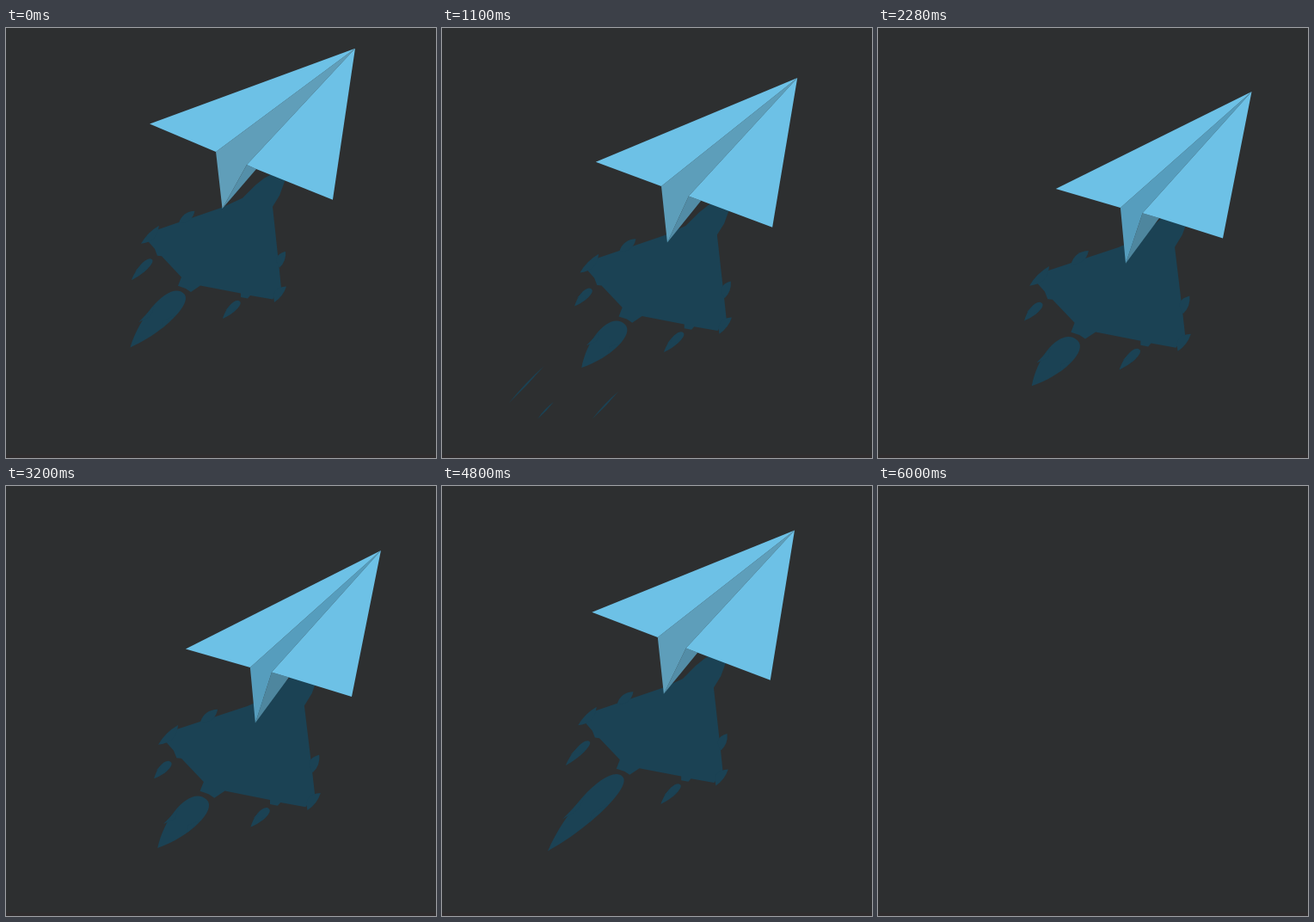
An HTML page with a canvas that plays this animation: 500 px wide and 500 px high, repeating every 6020 ms.

```html
<!DOCTYPE html>
<html lang="en">
<head>
<meta charset="utf-8">
<title>Paper plane</title>
<style>
html, body { margin: 0; width: 100%; height: 100%; overflow: hidden; background: #2d2f30; }
canvas { display: block; width: 500px; height: 500px; }
</style>
</head>
<body>
<canvas id="stage" width="500" height="500"></canvas>
<script>
const ctx = document.getElementById('stage').getContext('2d');
const LOOP = 6020, CYCLE = 6000;
const SHADE = '#1b4254', SKY = '#6dc1e6';

// Plane corners relative to the tip: at rest, and at full sway
const corners = {
  left: [[-239, 87.5], [-227, 114.5]],
  fold: [[-162, 120], [-152, 136]],
  keel: [[-154.5, 186], [-146, 200.5]],
  inner: [[-126, 135], [-127, 141.5]],
  back: [[-115, 140], [-107, 147.5]],
  right: [[-26, 176], [-34, 170]],
  shadow: [[-249, 226], [-259, 224.5]]
};

const hull = [
  [326, 160], [325, 175], [318, 194], [310, 207], [317.5, 277], [320, 302], [310, 314.5],
  [284, 310], [281, 313.5], [273, 312], [273, 307.5], [226, 298.5], [215, 306], [209, 302],
  [200, 299], [204, 289], [181, 264.5], [176, 264], [173, 256], [165, 247], [177, 233.5],
  [251, 208], [275, 197], [290, 182], [300, 174]
];

const clamp = v => Math.max(0, Math.min(1, v));
const lerp = (a, b, u) => a + (b - a) * u;
const smooth = u => u * u * (3 - 2 * u);

// Cubic curve from 0 to 1 with two control values
const bend = (u, c1, c2) =>
  3 * u * (1 - u) * (1 - u) * c1 + 3 * u * u * (1 - u) * c2 + u * u * u;

function poly(pts, color) {
  ctx.beginPath();
  for (const [x, y] of pts) ctx.lineTo(x, y);
  ctx.closePath();
  ctx.fillStyle = color;
  ctx.fill();
}

// Pointed leaf between two points, each side with its own bulge
function leaf(x1, y1, x2, y2, side1, side2) {
  const dx = x2 - x1, dy = y2 - y1, len = Math.hypot(dx, dy);
  const mx = (x1 + x2) / 2, my = (y1 + y2) / 2;
  const nx = -dy / len, ny = dx / len;
  ctx.beginPath();
  ctx.moveTo(x1, y1);
  ctx.quadraticCurveTo(mx + nx * side1, my + ny * side1, x2, y2);
  ctx.quadraticCurveTo(mx + nx * side2, my + ny * side2, x1, y1);
  ctx.fillStyle = SHADE;
  ctx.fill();
}

// Barbed flame trailing down and to the left
function flame(x, y, len, w) {
  ctx.save();
  ctx.translate(x, y);
  ctx.rotate(Math.PI * 0.75);
  ctx.beginPath();
  ctx.moveTo(0, 0);
  ctx.bezierCurveTo(0, w * 1.15, len * 0.55, w * 1.15, len, 0);
  ctx.bezierCurveTo(len * 0.55, -w * 0.85, 0, -w * 0.85, 0, 0);
  ctx.fillStyle = SHADE;
  ctx.fill();
  poly([[len * 0.38, w * 0.8], [len * 0.69, w * 0.76], [len * 0.52, w * 0.5]], SHADE);
  poly([[len * 0.28, -w * 0.6], [len * 0.53, -w * 0.58], [len * 0.45, -w * 0.3]], SHADE);
  ctx.restore();
}

// Quick flutter, with one long burst late in the loop
const flicker = t =>
  1 - 0.15 * Math.cos((t - 3945) / 237 * 2 * Math.PI)
  + 0.4 * Math.exp(-(((t - 4570) / 400) ** 4));

function drawRocket([x, y], k, t) {
  ctx.save();
  ctx.translate(x, y);
  ctx.transform(1 + 0.1145 * k, 0.0125 * k, 0.0127 * k, 1 + 0.0956 * k, 0, 0);
  ctx.translate(-157, -249);
  poly(hull, SHADE);
  leaf(157, 250, 178, 229, -4, 12);
  leaf(201, 226, 219.5, 212, -8, 10);
  leaf(325, 259, 318, 278, -5, 14);
  leaf(326, 299.5, 312, 318, -4, 14);
  flame(207, 308, 81 * flicker(t), 18);
  flame(170, 268.5, 29.5 * flicker(t + 40), 6);
  flame(272, 317, 28 * flicker(t + 90), 6);
  ctx.restore();
}

const streaks = [
  { from: [155.5, 320], to: [95, 420], half: 31, angle: 1.2 },
  { from: [182, 352], to: [117, 450], half: 14, angle: 2.3 },
  { from: [226, 361.5], to: [188, 443], half: 23, angle: 3.1 }
];

// Sparks shoot out, turn along the flight line, then drift and shrink
function drawStreaks(t) {
  if (t < 640 || t > 1840) return;
  const go = clamp((t - 640) / 600), fade = clamp((t - 1240) / 600);
  const out = 1 - (1 - go) ** 2;
  for (const { from, to, half, angle } of streaks) {
    const size = lerp(5, half, out) * (1 - fade * fade);
    ctx.save();
    ctx.translate(lerp(from[0], to[0], out) - 10 * fade, lerp(from[1], to[1], out) + 13 * fade);
    ctx.rotate(lerp(angle, 2.33, clamp(go * 2.7)));
    leaf(-size, 0, size, 0, 2.4, -1.6);
    ctx.restore();
  }
}

function drawPlane(p, sway) {
  const tint = (a, b) => 'rgb(' + a.map((c, i) => Math.round(lerp(c, b[i], smooth(sway)))) + ')';
  poly([p.inner, p.back, p.keel], tint([84, 143, 169], [78, 134, 158]));
  poly([p.tip, p.fold, p.keel, p.inner], tint([96, 158, 185], [86, 157, 189]));
  poly([p.tip, p.left, p.fold], SKY);
  poly([p.tip, p.inner, p.back, p.right], SKY);
}

function draw(now) {
  const t = now % LOOP;
  ctx.fillStyle = '#2d2f30';
  ctx.fillRect(0, 0, 500, 500);
  ctx.fillStyle = '#302d2e';
  ctx.fillRect(0, 496, 500, 4);
  if (t >= CYCLE) return;

  const sway = (1 - Math.cos((t + 150) / CYCLE * 2 * Math.PI)) / 2;
  const tip = [406 + 30.7 * bend(sway, -0.036, 0.77), 23 + 52.7 * bend(sway, 0.878, 0.87)];
  const p = { tip };
  for (const name in corners) {
    const [rest, full] = corners[name];
    p[name] = tip.map((v, i) => v + lerp(rest[i], full[i], sway * 1.03));
  }
  drawStreaks(t);
  drawRocket(p.shadow, sway * 1.03, t);
  drawPlane(p, sway);
}

let start = null;
function tick(now) {
  if (start === null) start = now;
  draw(now - start);
  requestAnimationFrame(tick);
}
draw(0);
requestAnimationFrame(tick);
</script>
</body>
</html>
```
